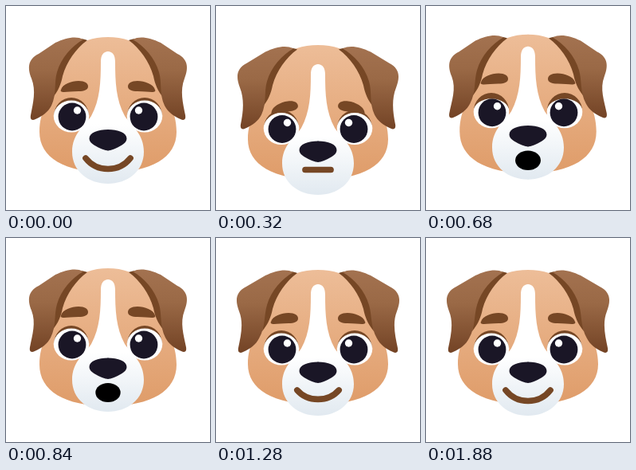
Animation of 256 by 256 pixels, one loop 1.92 s. Source, as an HTML page:

```html
<!DOCTYPE html>
<html>
<head>
<meta charset="utf-8">
<style>
html, body { margin: 0; height: 100%; overflow: hidden; background: #fff }
svg { display: block; width: 100vw; height: 100vh }
</style>
</head>
<body>
<svg viewBox="0 0 256 256">
  <defs>
    <linearGradient id="fur" x2="0" y2="1"><stop stop-color="#edbd98"/><stop offset="1" stop-color="#df9c69"/></linearGradient>
    <linearGradient id="flap" x2="0" y2="1"><stop stop-color="#a37250"/><stop offset=".4" stop-color="#9a6946"/><stop offset="1" stop-color="#734325"/></linearGradient>
    <linearGradient id="white" x2="0" y2="1"><stop offset=".55" stop-color="#fff"/><stop offset="1" stop-color="#e1e9f0"/></linearGradient>
  </defs>
  <g id="dog"></g>
</svg>
<script>
const LOOP = 1920, STEP = 40, BROWN = '#764725', INK = '#1a1626';
const dog = document.getElementById('dog');

const part = (t, a, b) => Math.min(1, Math.max(0, (t - a) / (b - a)));
const ease = (t, a, b) => { const x = part(t, a, b); return x * x * (3 - 2 * x); };

const shape = (d, fill, transform = '') => `<path d="${d}" fill="${fill}" transform="${transform}"/>`;
const oval = (x, y, rx, ry, fill) => `<ellipse cx="${x}" cy="${y}" rx="${rx}" ry="${ry}" fill="${fill}"/>`;
// each left part is followed by its mirror image
const both = s => `${s}<g transform="matrix(-1 0 0 1 256 0)">${s}</g>`;

function draw(t) {
  // the moods that drive every part, each from 0 to 1
  const crouch = ease(t, 0, 320) - ease(t, 320, 520);
  const bark = ease(t, 320, 520) * (1 - part(t, 520, 840)) ** 2;
  const alert = ease(t, 320, 520) - ease(t, 840, 1280);
  const calm = ease(t, 840, 1280);
  const flare = Math.sin(Math.PI * part(t, 520, 680));
  const smile = 1 - ease(t, 0, 320) + ease(t, 1040, 1360);

  const top = 39 + 10 * crouch - 9 * bark - alert + calm;
  const bottom = 209 + 9 * crouch - 5 * bark + 2 * alert;
  const wide = 1 + (2 * crouch - bark + 2 * calm) / 86;
  const earY = 11.5 * crouch - 10 * bark + calm;
  const blaze = 57 + 16 * crouch - 5 * (bark + alert) + calm;
  const chin = 223 + 14 * crouch - bark - 5 * alert;
  const browY = 101 + 26 * crouch - 8 * alert - 6 * bark;
  const eye = 138 + 15.5 * crouch - 5 * alert - bark + calm;
  const nose = 155 + 14.5 * crouch - 4.5 * alert - 2.5 * bark + calm / 2;

  const c = bark - 2 * crouch - 3 * calm;
  const tip = -3 * bark - 6 * flare - alert - 3 * calm;
  const rim = 22 + bark / 2, lidY = eye - 4 * bark;

  dog.innerHTML = [
    shape('M128.5 0C88 0 70 23 62 56C56 76 42 91 42 119C42 151 73 170 128.5 170Z', 'url(#fur)',
      `translate(128 ${top}) scale(${wide} ${(bottom - top) / 170}) translate(-128)`),
    shape(`M102 43C88 37 70 46 62 78L58 ${116}C66 106 69 98 71 88C76 70 88 53 102 43Z`,
      BROWN, `translate(0 ${earY})`),
    shape(`M97 42C88 37 75 40 62 46L${41 + c} 60C${27 + c} 67 ${27 + c} 78 ${32 + c} 91
      C${38 + c} 106 ${34 + tip} 122 ${31 + tip} 137C${30 + tip} 143 ${33 + tip} 144 ${37 + tip} 142
      C${46 + tip} 138 ${53 + tip} 133 ${57 + tip} 125C${64 + tip / 2} 110 60 96 64 83C69 65 83 50 97 42Z`,
      'url(#flap)', `translate(0 ${earY})`),
    shape('M128.5 0C122 0 119 5 119 13C119 38 118 61 107 81C99 93 83 103 83 126C83 150 103 166 128.5 166Z',
      'url(#white)', `translate(0 ${blaze}) scale(1 ${(chin - blaze) / 166})`),
    shape('M-17 4C-15-3-4-7 5-7C13-7 17-4 17 0C17 4 12 6 5 6C-3 6-9 7-13 7C-17 7-18 6-17 4Z', BROWN,
      `translate(86 ${browY}) rotate(${-7 * crouch})`),
    oval(82, eye, 22.3, 20.5, '#fff') +
      oval(83, eye + 1, 17.4, 17.4, INK) +
      oval(89.5, eye - 7, 4.7, 4.7, '#fff') +
      shape(`M${82 - rim} ${lidY}a${rim} ${23 - bark} 0 0 1 ${2 * rim} 0
        a${rim} ${19.5 - 16 * bark} 0 0 0 ${-2 * rim} 0Z`, BROWN),
    shape('M128.5 0C115 0 104.5 4 104.5 11.5C104.5 18 115 22 121 24.8Q125 26.6 128.5 26.6Z', INK,
      `translate(0 ${nose})`)
  ].map(both).join('') + mouth(t, crouch, bark, smile);
}

function mouth(t, crouch, bark, smile) {
  if (t >= 400 && t < 1040) {
    const open = ease(t, 360, 480) - ease(t, 840, 1040);
    return oval(128, 194 - bark + 10 * crouch, 14 + 1.7 * open + bark, 4 + 8 * open + bark, '#000');
  }
  const w = 16 + 12 * smile, y = 191 + 14.5 * crouch, depth = 18 * smile;
  return `<path d="M${128 - w} ${y}c${w * .5} ${depth} ${w * 1.5} ${depth} ${2 * w} 0"
    fill="none" stroke="${BROWN}" stroke-width="7.7" stroke-linecap="round"/>`;
}

const start = performance.now();
function frame() {
  draw(Math.floor((performance.now() - start) % LOOP / STEP) * STEP);
  requestAnimationFrame(frame);
}
frame();
</script>
</body>
</html>
```
